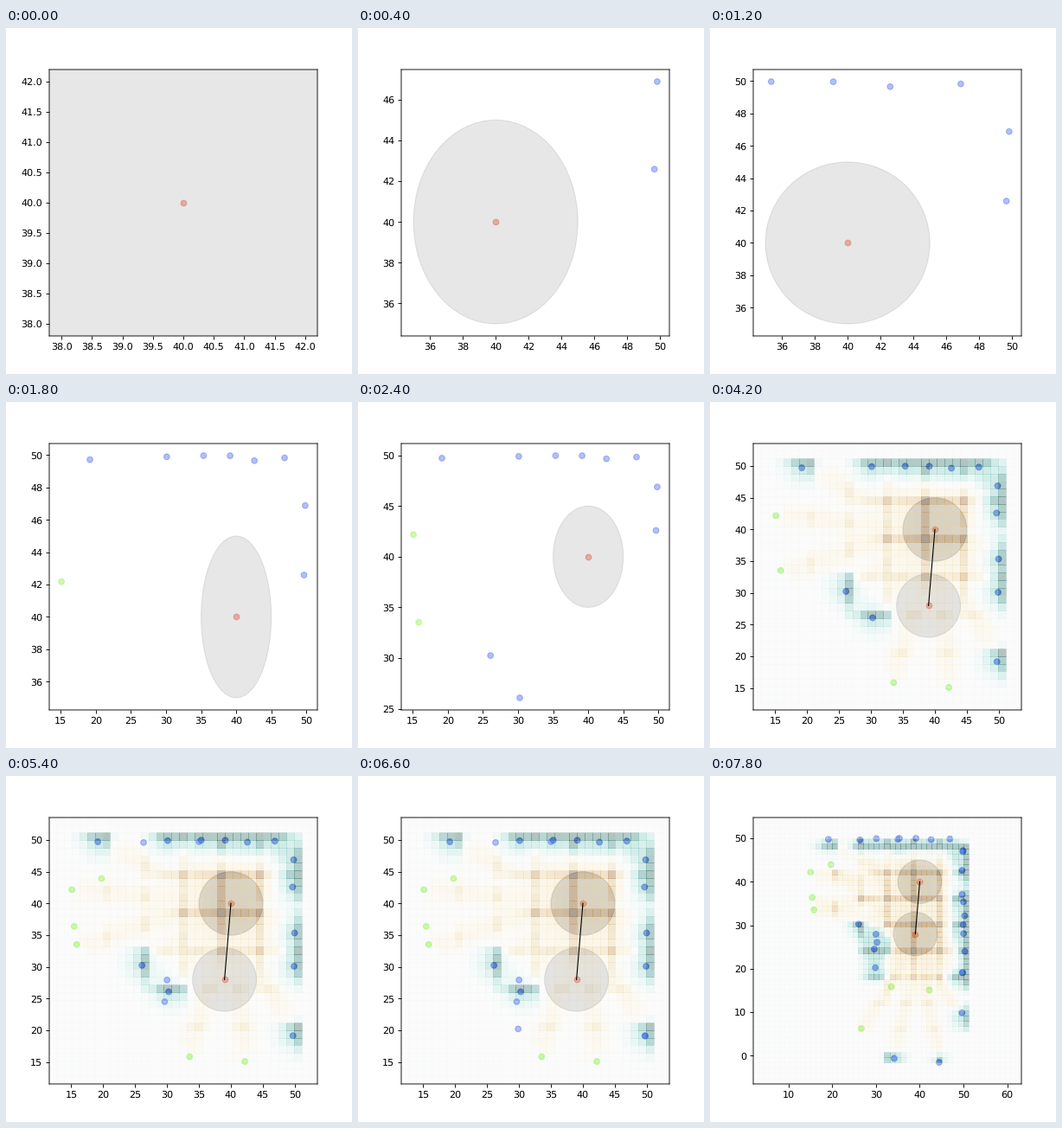
These frames come from a looping animation (400x400 px, 8 s). A matplotlib script:

```python
import matplotlib.pyplot as plt
import numpy as np
from matplotlib.animation import FuncAnimation
from matplotlib.patches import Circle

FRAMES, INTERVAL = 40, 200
MAX_RANGE = 25          # a beam of exactly this length hit nothing
HIT, MISS, ROBOT = "#4060f0", "#82f53c", "#dc553c"
ALPHA = 0.4
BIN = 1.2               # width of a map bin, in cells

FIRST_MAP, SECOND_ROBOT, SECOND_SCAN, SECOND_MAP = 18, 19, 22, 39

# soft, unsnapped lines and glyphs
plt.rcParams["path.snap"] = False
plt.rcParams["text.hinting"] = "none"


class Scan:
    """One turn of the range sensor, a beam every 20 degrees."""

    def __init__(self, x, y, start, ranges):
        self.pos = np.array([x, y])
        self.ranges = np.array(ranges)
        turn = np.radians(start + 20 * np.arange(len(ranges)))
        self.dirs = np.column_stack([np.cos(turn), np.sin(turn)])
        self.ends = self.pos + self.ranges[:, None] * self.dirs
        self.hit = self.ranges != MAX_RANGE
        self.colors = np.where(self.hit, HIT, MISS)


SCANS = [
    Scan(40, 40, 15, [10, 12, 12, 10, 10, 11, 14, 23, 25, 25, 17, 17,
                      25, 25, 23, 14, 11]),
    Scan(39, 28, 100.4, [22.1, 25.05, 25, 25, 9, 10, 12, 25, 29, 30,
                         21, 14, 12, 11, 12, 14, 22]),
]


def evidence(x, y, scans):
    """Occupied (positive) and free (negative) belief per cell."""
    free = np.zeros_like(x)
    solid = np.zeros_like(x)
    inside = (x <= 51.2) & (y <= 51.2) & (y >= -1)
    for scan in scans:
        dx, dy = x - scan.pos[0], y - scan.pos[1]
        for (ux, uy), reach, end, hit in zip(scan.dirs, scan.ranges,
                                             scan.ends, scan.hit):
            along = dx * ux + dy * uy
            across = dx * uy - dy * ux
            beam = np.exp(-(across / 1.4) ** 2 - along / 40)
            free += np.where((along > -0.5) & (along < reach - 1), beam, 0)
            if hit:
                d2 = (x - end[0]) ** 2 + (y - end[1]) ** 2
                solid += 1.2 * inside * np.exp(-d2 / 2.2 ** 2)
    solid = np.clip(solid, 0, 1)
    return solid - (1 - solid) * 0.7 * np.tanh(0.9 * free)


class GridMap:
    """Unit cells summed into slightly wider bins."""

    def __init__(self, left, bottom, cells, offset, lift, scans):
        i = np.arange(cells) + offset
        x, y = np.meshgrid(left + i, bottom + i + lift)
        k = (i / BIN).astype(int)
        n = k.max() + 1
        self.bins = np.zeros((n, n))
        np.add.at(self.bins, (k[:, None], k[None, :]),
                  evidence(x, y, scans))
        self.x = left + BIN * np.arange(n + 1)
        self.y = bottom + BIN * np.arange(n + 1)

    def draw(self):
        ax.pcolormesh(self.x, self.y, self.bins, cmap="BrBG",
                      vmin=-2.2, vmax=2.2, alpha=0.3)

    def limits(self):
        return self.x[[0, -1]], self.y[[0, -1]]


MAPS = [GridMap(11.55, 11.55, 42, 0.45, 0, SCANS[:1]),
        GridMap(2.0, -6.46, 61, 0.02, 1, SCANS)]

fig = plt.figure(figsize=(5, 5), dpi=80)
ax = fig.add_subplot()


def draw_scan(scan, count, coats=1):
    for _ in range(coats):
        ax.add_patch(Circle(scan.pos, 5, color="gray", alpha=0.19))
        ax.scatter(*scan.pos, color=ROBOT, alpha=ALPHA)
        if count:
            ax.scatter(*scan.ends[:count].T, c=list(scan.colors[:count]),
                       alpha=ALPHA)


def auto_limits(count):
    if count == 0:
        return (37.8, 42.2), (37.8, 42.2)
    spans = []
    for axis, centre in enumerate(SCANS[0].pos):
        values = SCANS[0].ends[:count, axis]
        low = min(values.min(), centre - 5)
        high = max(values.max(), centre + 5)
        pad = 0.05 * (high - low)
        spans.append((low - pad, high + pad))
    return spans


def update(frame):
    ax.clear()
    first = min(frame, 17)
    second = min(max(frame - SECOND_SCAN + 1, 0), 17)
    if frame < FIRST_MAP:
        draw_scan(SCANS[0], first)
        xlim, ylim = auto_limits(first)
    else:
        # a map update repaints the older readings, then covers them
        draw_scan(SCANS[0], first, coats=2)
        if frame >= SECOND_MAP:
            draw_scan(SCANS[1], second, coats=2)
        grid = MAPS[int(frame >= SECOND_MAP)]
        grid.draw()
        xlim, ylim = grid.limits()
    if SECOND_ROBOT <= frame < SECOND_MAP:
        draw_scan(SCANS[1], second)
    if frame >= SECOND_ROBOT:
        ax.plot(*np.array([s.pos for s in SCANS]).T, color="black", lw=1)
    ax.set_xlim(xlim)
    ax.set_ylim(ylim)
    return []


anim = FuncAnimation(fig, update, frames=FRAMES, interval=INTERVAL,
                     init_func=lambda: [], repeat=True, repeat_delay=0)
plt.show()
```
